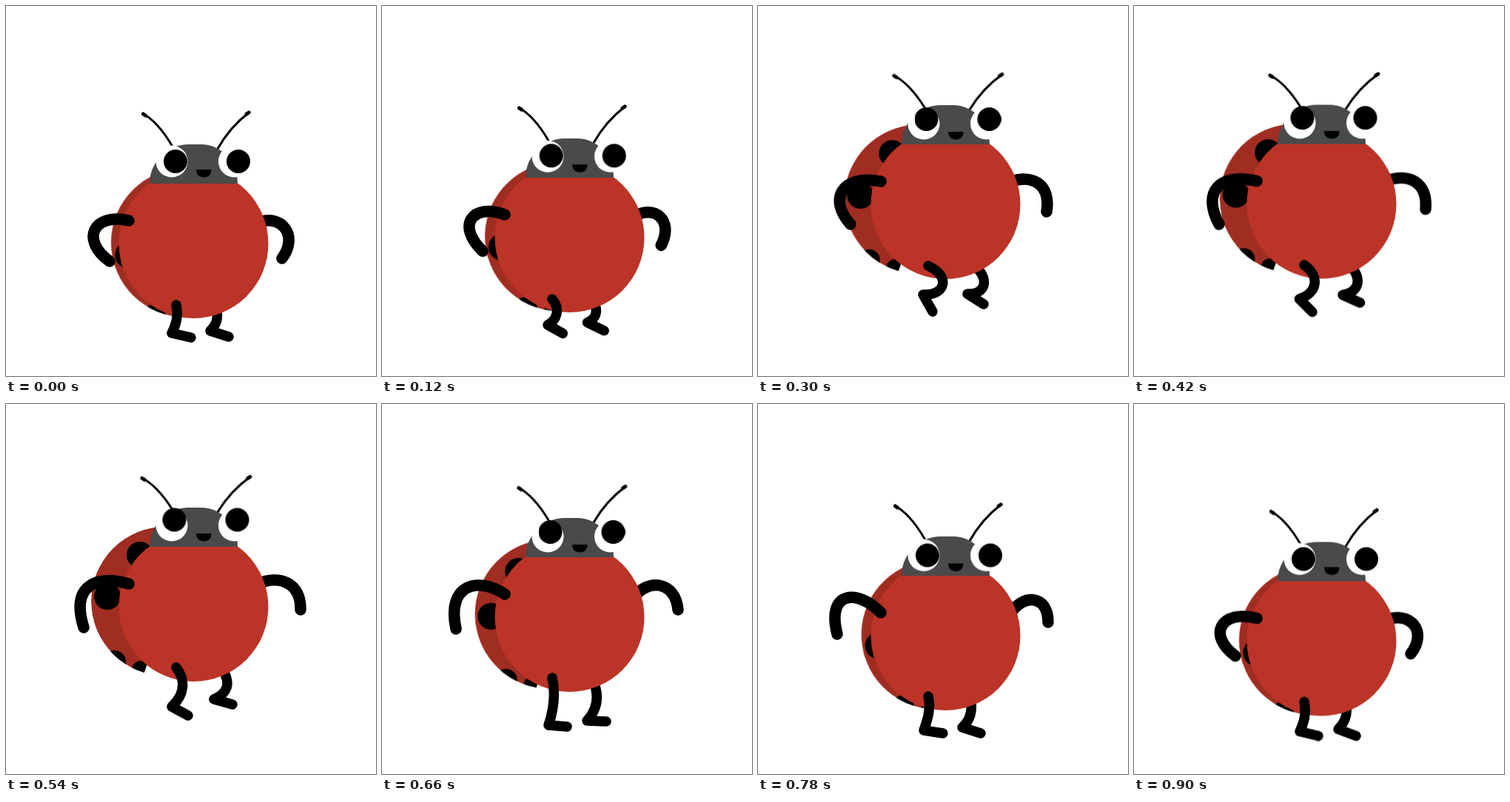
An HTML page without scripts for the animation above (960 ms loop, 500 by 500 pixels).

```html
<!DOCTYPE html>
<html lang="en">
<head>
<meta charset="utf-8">
<title>Jumping ladybug</title>
<style>
html, body { margin: 0; width: 100%; height: 100%; overflow: hidden; background: #fff; }
svg { display: block; width: 100vw; height: 100vh; }

/* Poses are held for 60 ms: most segments have two holds */
.move {
  animation: 960ms infinite;
  animation-timing-function: steps(2);
  animation-timing-function: linear(0 0% 50%, .6 50% 100%);
}
.bug { animation-name: hop; animation-timing-function: step-end; }
.wing { animation-name: flap; transform-origin: 250px 227px; }
.feeler { animation-name: sway; }
.left { --tilt: -2deg; transform-origin: 225px 190px; }
.right { --tilt: 2deg; transform-origin: 286px 193px; }
.face { animation-name: nod; }
.pupils { animation-name: look; }
.limb { fill: none; stroke: #000; stroke-width: 15.5; stroke-linecap: round; stroke-linejoin: round; }
.leg { stroke-width: 13.5; }
.near-arm { animation-name: near-arm; }
.far-arm { animation-name: far-arm; }
.near-leg { animation-name: near-leg; }
.far-leg { animation-name: far-leg; }

@keyframes hop {
  0%, 100% { transform: translateY(0); }
  6.25% { transform: translateY(-1px); }
  12.5% { transform: translateY(-8px); }
  18.75% { transform: translateY(-27.5px); }
  25% { transform: translateY(-46px); }
  31.25% { transform: translateY(-53px); }
  37.5% { transform: translateY(-54px); }
  43.75% { transform: translateY(-53.5px); }
  50% { transform: translateY(-51.5px); }
  56.25% { transform: translateY(-47px); }
  62.5% { transform: translateY(-41px); }
  68.75% { transform: translateY(-33px); }
  75% { transform: translateY(-20px); }
  81.25% { transform: translateY(-8px); }
  87.5% { transform: translateY(-2.5px); }
  93.75% { transform: translateY(-.5px); }
}
@keyframes flap {
  0% { transform: rotate(-17deg); animation-timing-function: linear(0 0% 33.3%, .04 33.3% 66.6%, .3 66.6% 100%); }
  18.75% { transform: rotate(-11deg); }
  31.25% { transform: rotate(-1deg); animation-timing-function: steps(4); }
  56.25% { transform: rotate(0deg); }
  68.75% { transform: rotate(-6.8deg); }
  81.25% { transform: rotate(-15.6deg); }
  93.75%, 100% { transform: rotate(-17deg); }
}
@keyframes sway {
  0%, 81.25%, 100% { transform: rotate(0deg); }
  31.25%, 56.25% { transform: rotate(var(--tilt)); }
}
@keyframes nod {
  0%, 93.75%, 100% { transform: translateY(0); }
  18.75%, 31.25%, 68.75% { transform: translateY(2px); }
  56.25% { transform: translateY(1px); }
  81.25% { transform: translateY(2.5px); }
}
@keyframes look {
  0%, 81.25%, 93.75%, 100% { transform: translate(0, 0); }
  18.75% { transform: translate(-.5px, -1.5px); }
  31.25% { transform: translate(-1.5px, -6px); animation-timing-function: steps(4); }
  56.25% { transform: translate(-1.5px, -7.5px); }
  68.75% { transform: translate(-1.5px, -6px); }
}
@keyframes near-arm {
  0% { d: path("M166 290C118 279 100 316 140 345"); animation-timing-function: linear(0 0% 33.3%, .04 33.3% 66.6%, .3 66.6% 100%); }
  18.75% { d: path("M166 290C133 262 98 277 127 326"); }
  31.25% { d: path("M166 290C112 280 95 315 125 348"); animation-timing-function: steps(4); }
  56.25% { d: path("M166 290C118 277 88 295 105 349"); }
  68.75% { d: path("M166 290C128 265 87 278 100 337"); }
  81.25% { d: path("M166 290C135 258 92 260 107 319"); }
  93.75%, 100% { d: path("M166 290C118 278 98 312 137 341"); }
}
@keyframes far-arm {
  0% { d: path("M340 293C372 280 396 310 373 341"); animation-timing-function: linear(0 0% 33.3%, .04 33.3% 66.6%, .3 66.6% 100%); }
  18.75% { d: path("M342 291C358 267 392 267 387 309"); }
  31.25% { d: path("M340 291C372 279 396 295 390 331"); animation-timing-function: steps(4); }
  56.25% { d: path("M340 290C370 277 399 289 398 325"); }
  68.75% { d: path("M340 295C358 269 396 271 400 311"); }
  81.25% { d: path("M342 290C358 265 392 265 392 303"); }
  93.75%, 100% { d: path("M340 293C372 279 398 307 374 338"); }
}
@keyframes near-leg {
  0% { d: path("M230 404C233 420 230 430 224 442L250 448"); animation-timing-function: linear(0 0% 33.3%, .04 33.3% 66.6%, .3 66.6% 100%); }
  18.75% { d: path("M230 404C262 413 250 438 224 432L231 456"); }
  31.25% { d: path("M230 404C262 419 252 445 223 443L236 466"); animation-timing-function: steps(4); }
  56.25% { d: path("M230 403C242 419 243 438 224 456L246 468"); }
  68.75% { d: path("M230 403C234 421 233 443 225 467L250 469"); }
  81.25% { d: path("M230 403C234 420 229 435 224 449L250 453"); }
  93.75%, 100% { d: path("M230 403C233 420 230 430 224 443L249 449"); }
}
@keyframes far-leg {
  0% { d: path("M284 408C288 424 283 432 276 439L301 447"); animation-timing-function: linear(0 0% 33.3%, .04 33.3% 66.6%, .3 66.6% 100%); }
  18.75% { d: path("M292 408C305 418 299 430 281 428L298 446"); }
  31.25% { d: path("M296 407C313 425 306 443 283 442L305 456"); animation-timing-function: steps(4); }
  56.25% { d: path("M292 405C305 425 299 438 281 446L306 453"); }
  68.75% { d: path("M287 411C294 431 289 448 277 461L303 462"); }
  81.25% { d: path("M288 410C290 428 284 438 276 445L301 453"); }
  93.75%, 100% { d: path("M287 408C289 424 283 433 276 440L300 449"); }
}
</style>
</head>
<body>
<svg viewBox="0 0 500 500">
  <defs>
    <clipPath id="shell"><circle cx="216" cy="313.5" r="101"/></clipPath>
    <clipPath id="seam"><path d="M90 190H268L183 420H90Z"/></clipPath>
  </defs>
  <g class="move bug">
    <path class="move limb far-arm" d="M340 293C372 280 396 310 373 341"/>
    <path class="move limb leg far-leg" d="M284 408C288 424 283 432 276 439L301 447"/>

    <g class="move wing">
      <g clip-path="url(#seam)">
        <g clip-path="url(#shell)">
          <circle cx="216" cy="313.5" r="101" fill="#a02d22"/>
          <circle cx="181" cy="251" r="18"/>
          <circle cx="137" cy="307" r="18"/>
          <circle cx="147" cy="395" r="15"/>
          <circle cx="182" cy="406" r="12"/>
        </g>
      </g>
    </g>
    <circle cx="253.5" cy="321" r="101" fill="#bb3427"/>

    <g fill="none" stroke="#000" stroke-width="3" stroke-linecap="round">
      <g class="move feeler left">
        <path d="M225 190Q206 157 185 145.500"/>
        <path stroke-width="5" d="M185.500 146l3 2"/>
      </g>
      <g class="move feeler right">
        <path d="M286 193Q303 163 329 143.500"/>
        <path stroke-width="5" d="M328 144l-3 2"/>
      </g>
    </g>
    <path fill="#4a4a4a" d="M194 240C194 210 219 187 247 187H264C290 187 313 210 313 240Z"/>
    <g class="move face">
      <circle cx="224" cy="210" r="21.5" fill="#fff"/>
      <circle cx="308.5" cy="210" r="21.5" fill="#fff"/>
      <g class="move pupils">
        <circle cx="229" cy="210" r="16"/>
        <circle cx="314" cy="210" r="16"/>
      </g>
      <path d="M257 221h20.500c0 7-4 10.500-10 10.500s-10.500-3.500-10.500-10.500z"/>
    </g>

    <path class="move limb leg near-leg" d="M230 404C233 420 230 430 224 442L250 448"/>
    <path class="move limb near-arm" d="M166 290C118 279 100 316 140 345"/>
  </g>
</svg>
</body>
</html>
```
